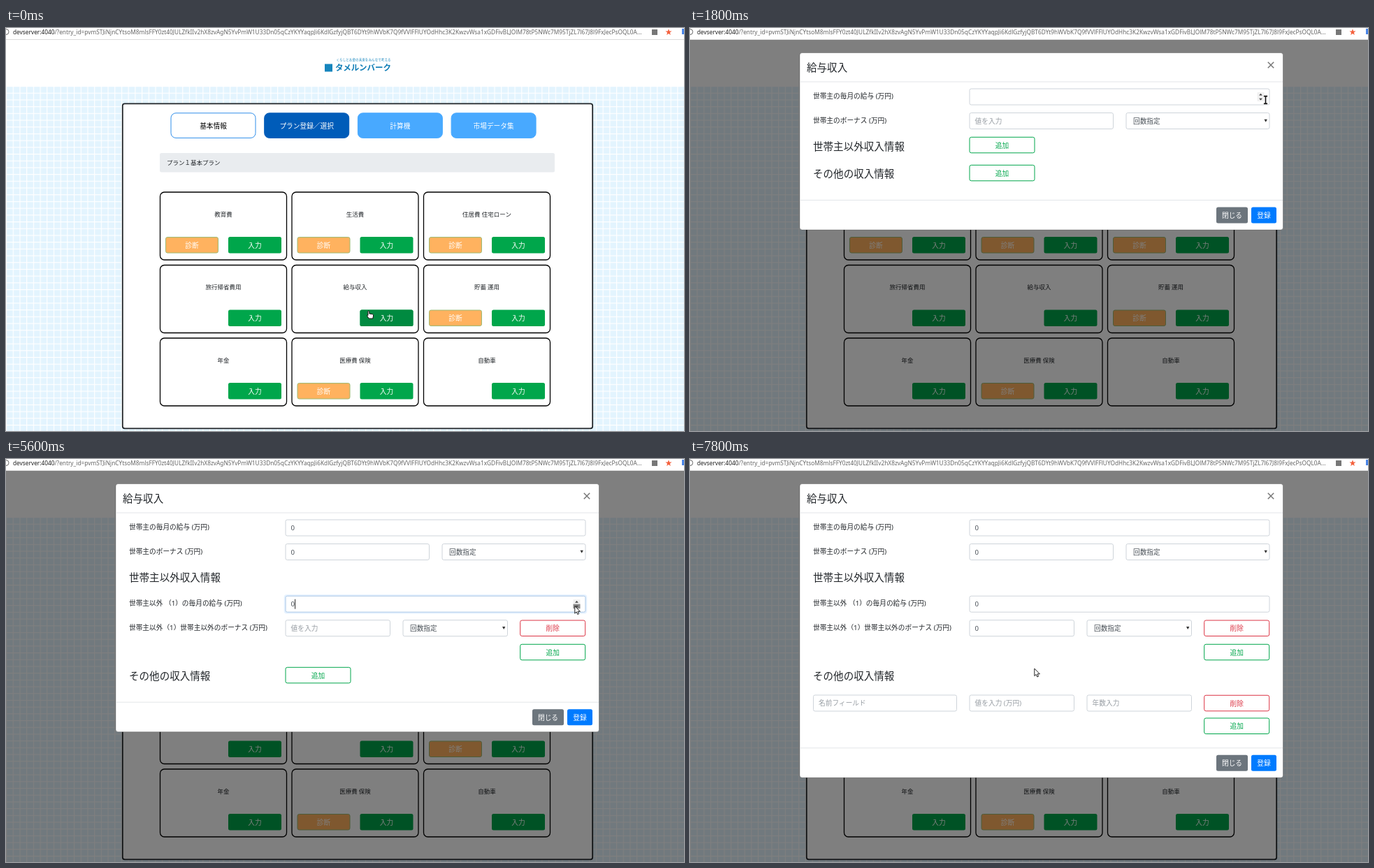
Write an HTML page that moves like this. It is 970 px wide and 577 px high and loops after 8 s.

```html
<!DOCTYPE html>
<html lang="ja">
<head>
<meta charset="utf-8">
<title>給与収入</title>
<style>
html, body { margin: 0; width: 100%; height: 100%; overflow: hidden; background: #fff; }
#stage { position: relative; width: 970px; height: 577px; overflow: hidden; }
svg { position: absolute; left: 0; top: 0; }
svg, #url { font-family: "Noto Sans", "Noto Sans CJK JP", sans-serif; }
#url {
  position: absolute; left: 10px; top: -1px; width: 901px; height: 13px;
  font-size: 8.3px; line-height: 13px; color: #666;
  white-space: nowrap; overflow: hidden; text-overflow: ellipsis;
}
#url b { font-weight: 400; color: #222; }
</style>
</head>
<body>
<div id="stage">
  <svg id="art" width="970" height="577" viewBox="0 0 970 577"></svg>
  <div id="url"><b>devserver:4040</b>/?entry_id=<span id="token"></span></div>
</div>
<script>
const LOOP = 8000, STEP = 100;
const BASE = 9.7, SMALL = 8.5, LARGE = 14.55;
const GREEN = '#00a64b', ORANGE = '#ffb25f', RED = '#dc3545', INK = '#212529', FIELD = '#495057';

// Drawing helpers; y of a text is its middle line.
const on = (spans, body) => `<g data-on="${spans}">${body}</g>`;
const rect = (x, y, w, h, r, fill, stroke = 'none', sw = 1) =>
  `<rect x="${x}" y="${y}" width="${w}" height="${h}" rx="${r}" fill="${fill}" stroke="${stroke}" stroke-width="${sw}"/>`;
const text = (x, y, size, str, fill = INK, attrs = '') =>
  `<text x="${x}" y="${y + size * .37}" font-size="${size}" fill="${fill}" ${attrs}>${str}</text>`;
const mid = (x, y, size, str, fill) => text(x, y, size, str, fill, 'text-anchor="middle"');
const path = (d, fill, stroke = 'none', sw = 1) =>
  `<path d="${d}" fill="${fill}" stroke="${stroke}" stroke-width="${sw}"/>`;
const button = (x, y, w, h, label, fill, stroke = 'none', color = '#fff', r = 2.5) =>
  rect(x, y, w, h, r, fill, stroke) + mid(x + w / 2, y + h / 2 + .5, BASE, label, color);
const outline = (x, y, label, color) => button(x, y, 93, 22.5, label, '#fff', color, color);

// ---- Page ----
// Seeded letters and digits for the address bar.
function randomText(length, seed) {
  let out = '';
  while (out.length < length) {
    seed = (seed * 16807) % 2147483647;
    const c = String.fromCharCode(48 + seed % 75);
    if (/[0-9A-Za-z]/.test(c)) out += c;
  }
  return out;
}

function chrome() {
  const star = Array.from({ length: 10 }, (_, i) => {
    const r = i % 2 ? 2 : 4.8, a = i * Math.PI / 5;
    return (948 + r * Math.sin(a)).toFixed(1) + ' ' + (6 - r * Math.cos(a)).toFixed(1);
  }).join('L');
  return rect(0, 0, 970, 17, 0, '#fff') + rect(0, 16, 970, 1, 0, '#dcdcdc') +
    '<circle cx="0" cy="5.5" r="4" fill="none" stroke="#666"/>' +
    rect(924, 2, 8, 8, 0, '#777') + path(`M${star}Z`, '#f4623f') +
    rect(967, 1, 3, 8, 0, '#4a86e8');
}

function card(i, title, check) {
  const x = 220.5 + i % 3 * 188.5, y = 235 + Math.floor(i / 3) * 104.5;
  const enter = fill => button(x + 97.5, y + 64, 76, 23.5, '入力', fill);
  return rect(x, y, 181, 97, 6, '#fff', '#000', 1.3) +
    mid(x + 90.5, y + 31.5, SMALL, title) +
    (check ? button(x + 8, y + 64.5, 75, 22.5, '診断', ORANGE, '#9dba72') : '') +
    enter(GREEN) + (i === 4 ? on('0 700', enter('#008a40')) : '');
}

function page() {
  const tabs = [
    ['基本情報', '#fff', '#2f8eea', '#000'], ['プラン登録／選択', '#005cb9'],
    ['計算機', '#48a9ff'], ['市場データ集', '#48a9ff']
  ];
  const cards = [
    ['教育費', 1], ['生活費', 1], ['住居費 住宅ローン', 1], ['旅行帰省費用'], ['給与収入'],
    ['貯蓄 運用', 1], ['年金'], ['医療費 保険', 1], ['自動車']
  ];
  return `<defs><pattern id="grid" width="9.7" height="9.7" y="83" patternUnits="userSpaceOnUse">
      ${rect(0, 0, 9.7, 9.7, 0, '#e3f4fe') + rect(0, 0, 9.7, 1.2, 0, '#fff') + rect(0, 0, 1.2, 9.7, 0, '#fff')}
    </pattern></defs>` +
    rect(0, 17, 970, 66, 0, '#fff') + rect(0, 83, 970, 494, 0, 'url(#grid)') +
    rect(456, 51.5, 11, 11, 0, '#1585bd') +
    mid(511.5, 45, 4.6, 'くらしとお金の未来をみんなで考える', '#1585bd') +
    text(471, 57.2, 11.5, 'タメルンバーク', '#0f7db6', 'font-weight="700"') +
    rect(166.8, 108.3, 672.4, 465, 3, '#fff', '#212529', 1.8) +
    tabs.map(([s, f, line, c], i) => button(236 + i * 133.7, 121.8, 121, 35.6, s, f, line || f, c, 7)).join('') +
    rect(220, 179, 565, 27.5, 2.5, '#e9ecef') + text(230, 193, SMALL, 'プラン１基本プラン') +
    cards.map((c, i) => card(i, ...c)).join('');
}

// ---- Dialog ----
const glow = (x, y, w, opacity) => `<g opacity="${opacity}">` +
  rect(x - 1.2, y - 1.2, w + 2.4, 25.4, 3, 'none', '#bfdeff', 2.2) +
  rect(x, y, w, 23, 2.4, 'none', '#80bdff') + '</g>';

function spinner(x, y, pressed) {
  return rect(x - 5, y - 6.5, 10, 13, 0, '#f1f1f1') +
    (pressed ? rect(x - 5, y, 10, 6.5, 0, '#8c8c8c') : '') +
    path(`M${x - 2.4} ${y - 2}h4.8l-2.4 -2.8zM${x - 2.4} ${y + 2.2}h4.8l-2.4 2.8z`, '#444');
}

// s holds the time spans of each state of the field.
function input(x, y, w, s) {
  const cy = y + 11.7, zero = color => text(x + 7.6, cy, BASE, '0', color);
  const parts = {
    hint: () => text(x + 7.6, cy, BASE, s.label || '値を入力', '#979da3'),
    zero: () => zero(FIELD),
    dim: () => glow(x, y, w, .4),
    lit: () => glow(x, y, w, 1),
    caret: () => rect(x + 13.2, y + 4.5, .9, 14, 0, '#111'),
    select: () => rect(x + 7.3, y + 4.5, 6, 14, 0, '#f07746') + zero('#fff'),
    spin: () => spinner(x + w - 12.5, y + 11.5),
    press: () => spinner(x + w - 12.5, y + 11.5, true)
  };
  return rect(x, y, w, 23, 2.4, '#fff', '#ced4da') +
    Object.keys(parts).filter(k => s[k]).map(k => on(s[k], parts[k]())).join('');
}

const select = (x, y, w) => rect(x, y, w, 23, 2.4, '#fff', '#ced4da') +
  text(x + 10, y + 12.2, BASE, '回数指定', FIELD) +
  path(`M${x + w - 7.5} ${y + 9.3}h4.4l-2.2 4z`, '#333');

const frame = bottom =>
  rect(157, 35.5, 691.5, bottom - 35.5, 3.5, '#fff', 'rgba(0,0,0,.25)') +
  rect(157.5, 76.5, 690.5, 1, 0, '#e3e6e9') + rect(157.5, bottom - 43, 690.5, 1, 0, '#e3e6e9') +
  text(167, 56.5, LARGE, '給与収入') +
  path('M826.8 48.8l8.4 8.4M835.2 48.8l-8.4 8.4', 'none', '#777', 1.5) +
  button(753, bottom - 32.5, 45, 23, '閉じる', '#6c757d') +
  button(803, bottom - 32.5, 36, 23, '登録', '#007bff');

function dialog() {
  const label = (y, s) => text(176, y, BASE, s);
  const head = (y, s) => text(176, y, LARGE, s);
  const ALL = '0 8000';
  return on('700 8000', rect(0, 17, 970, 560, 0, 'rgba(0,0,0,.5)')) +
    on('700 5600', frame(289) + outline(400, 156.3, '追加', GREEN) +
      head(209, 'その他の収入情報') + outline(400, 196.3, '追加', GREEN)) +
    on('5600 7800', frame(390.7) + outline(400, 298.3, '追加', GREEN)) +
    on('7800 8000', frame(456.3) +
      input(176.5, 338, 205, { hint: ALL, label: '名前フィールド' }) +
      input(400, 338, 149.5, { hint: ALL, label: '値を入力 (万円)' }) +
      input(568, 338, 149.5, { hint: ALL, label: '年数入力' }) +
      outline(735.7, 338.3, '削除', RED) + outline(735.7, 371, '追加', GREEN)) +
    on('700 8000',
      label(97.3, '世帯主の毎月の給与 (万円)') +
      input(400, 87, 429, {
        spin: '700 1500 1800 2000 2100 5600', press: '2000 2100', zero: '2000 8000',
        dim: '2000 2100', lit: '2100 5600', caret: '2000 2100', select: '2100 5600'
      }) +
      label(132, '世帯主のボーナス (万円)') +
      input(400, 121.5, 205.5, { hint: '700 5600', zero: '5600 8000', spin: '2800 5600' }) +
      select(624, 121.5, 205) +
      head(169.3, '世帯主以外収入情報')) +
    on('5600 8000',
      label(206.3, '世帯主以外 （1）の毎月の給与 (万円)') +
      input(400, 196.2, 429, {
        zero: ALL, dim: '5600 5700 7100 7400', lit: '5700 7100',
        caret: '5600 5700', select: '5700 7100', press: '5600 5700', spin: '5700 7100'
      }) +
      label(241, '世帯主以外（1）世帯主以外のボーナス (万円)') +
      input(400, 230.7, 149.5, {
        hint: '5600 7100', zero: '7100 8000', dim: '7100 7400', lit: '7400 7800',
        caret: '7100 7400', select: '7400 7800', press: '7100 7400', spin: '6400 7100 7400 7800'
      }) +
      select(568, 230.7, 149.5) +
      outline(735.7, 231, '削除', RED) + outline(735.7, 265.3, '追加', GREEN) +
      head(311, 'その他の収入情報'));
}

// ---- Pointer ----
const beam = 'M-2.6 -5.4H2.6M0 -5.4V5.4M-2.6 5.4H2.6';
const shapes = {
  arrow: path('M0 0V10.6L2.4 8.4L4 12L5.8 11.2L4.2 7.8H7.6Z', '#fff', '#222'),
  text: path(beam, 'none', '#fff', 3) + path(beam, 'none', '#111', 1.6),
  hand: path('M-3.2 -5.5Q-2 -6.6 -1.2 -5.2V-2L3.4 -1.2Q4.8 -.8 4.6 1L3.8 5H-1.8L-4.6 .8Q-4.4 -.6 -3 .4Z', '#fff', '#111')
};

// arrival time, x, y, shape, travel time before arrival
const moves = [
  [0, 521, 411, 'hand'], [700, 439.5, 102, 'text'],
  [1100, 620, 106, 'text', 300], [1400, 815, 104, 'text', 300],
  [1500, 842, 117, 'arrow'], [1600, 843, 104, 'arrow'], [1700, 836, 88, 'arrow'],
  [1800, 823.5, 103, 'text'], [1900, 815, 101, 'arrow'],
  [2600, 653, 128, 'arrow', 400], [2700, 622, 134, 'arrow'],
  [2800, 590, 142, 'text'], [2900, 572, 145, 'text'], [3000, 588, 137, 'text'],
  [5600, 813.8, 210.5, 'arrow'], [6200, 585, 228, 'arrow', 300],
  [6400, 530, 241, 'text'], [6600, 533, 242, 'arrow'],
  [6800, 530, 244, 'arrow'], [6900, 534, 246, 'arrow'],
  [7500, 491.8, 305.5, 'arrow', 200], [7800, 492.8, 300, 'arrow']
];

function pointerAt(t) {
  let [, x, y, shape] = moves[0];
  for (const [end, nx, ny, kind, span = 0] of moves) {
    if (t >= end) { x = nx; y = ny; shape = kind; continue; }
    const k = span ? (t - end + span) / span : 0;
    if (k > 0) { x += (nx - x) * k; y += (ny - y) * k; shape = kind; }
    break;
  }
  return { x, y, shape };
}

const art = document.getElementById('art');
document.getElementById('token').textContent = randomText(240, 4177);
art.innerHTML = page() + dialog() + chrome() + '<g id="pointer">' +
  Object.keys(shapes).map(k => `<g data-shape="${k}">${shapes[k]}</g>`).join('') + '</g>';

const pointer = document.getElementById('pointer');
const timed = [...art.querySelectorAll('[data-on]')].map(el => ({ el, spans: el.dataset.on.split(' ').map(Number) }));

function render(t) {
  for (const { el, spans } of timed) {
    // An odd count of passed bounds means the part is showing.
    const shown = spans.filter(b => b <= t).length % 2;
    el.style.display = shown ? '' : 'none';
  }
  const { x, y, shape } = pointerAt(t);
  pointer.setAttribute('transform', `translate(${x} ${y})`);
  for (const g of pointer.children) g.style.display = g.dataset.shape === shape ? '' : 'none';
}

function tick() {
  const t = performance.now() % LOOP;
  render(Math.floor(t / STEP) * STEP);
  requestAnimationFrame(tick);
}
tick();
</script>
</body>
</html>
```
